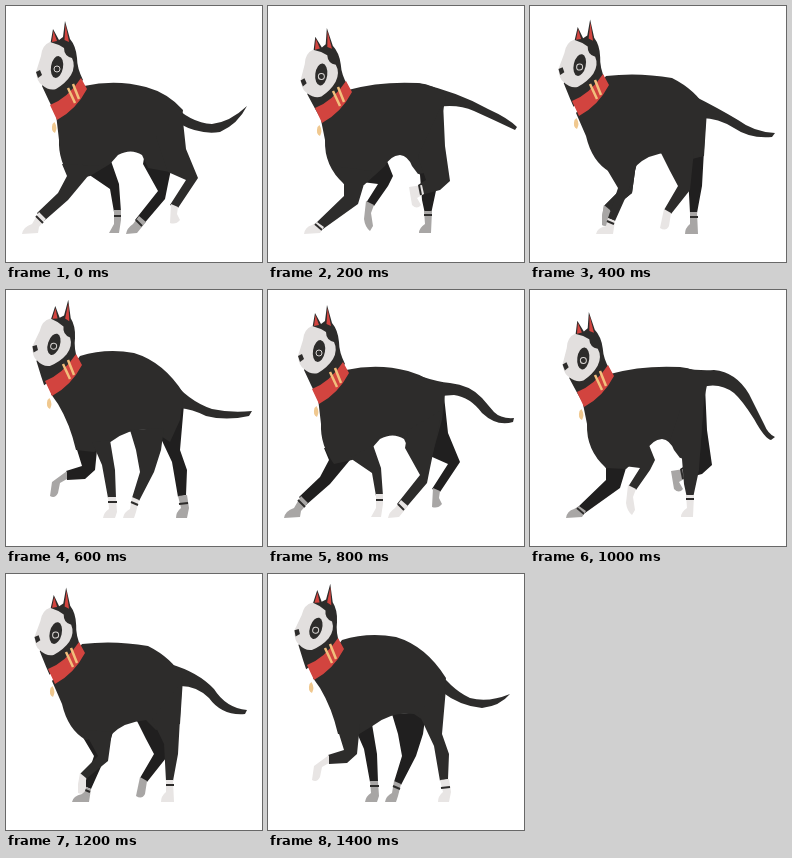
An HTML page without scripts that plays this animation: 256 by 256 pixels, repeating every 1.6 s.

```html
<!DOCTYPE html>
<html lang="en">
<head>
<meta charset="utf-8">
<title>Walking dog</title>
<style>
html, body { margin: 0; width: 100%; height: 100%; overflow: hidden; background: #fff; }
svg { display: block; width: 100vw; height: 100vh; }
.near { --coat: #2d2c2b; --paw: #e8e5e4; }
.far { --coat: #201f1f; --paw: #a8a6a5; }
.coat, .tail { fill: #2d2c2b; }
.leg { fill: var(--coat); }
.paw { fill: var(--paw); }
.band { fill: none; stroke: #2d2c2b; stroke-width: 2; }
.red { fill: #d2443f; }
.gold { fill: none; stroke: #f2bf7c; stroke-width: 2.5; }
.pose { visibility: hidden; animation: show 1.6s step-end calc((var(--i) - 8) * .2s) infinite; }
@keyframes show {
  0% { visibility: visible; }
  12.5%, 100% { visibility: hidden; }
}
</style>
</head>
<body>
<svg viewBox="0 0 256 256">
<defs>
  <g id="head">
    <path class="coat" d="M44 40L47 23L53 34L57 31L59 15L64 33Q70 40 71 52Q71 62 77 74L47 103L43 95L36 80L46 56Z"/>
    <path class="red" d="M46 36L47.500 25L51 35ZM58.500 34L59.500 18L63 36Z"/>
    <path fill="#e2dfde" d="M44 36Q36 39 35 50L30 66Q31 76 36 79Q43 85 50 83Q60 77 65 69Q70 60 66 52Q58 50 58 42Q52 38 44 36Z"/>
    <ellipse class="coat" cx="51" cy="61" rx="6" ry="11" transform="rotate(10 51 61)"/>
    <circle cx="51" cy="63" r="3" fill="none" stroke="#d8d5d3"/>
    <path class="coat" d="M30 66L34 64L36 69L32 72Z"/>
  </g>
  <g id="collar">
    <path class="red" d="M44 99Q62 92 75 72L81 83Q70 104 51 114Z"/>
    <path class="gold" d="M62 82L69 97M67 78L73 93"/>
    <path fill="#f0c88f" d="M48.500 116Q52 122 49 127Q44.500 125 46.500 118Z"/>
  </g>

  <!-- torsos: reach, contact, pass, lift -->
  <g id="t0">
    <path class="coat" d="M50 108L78 80Q110 73 140 81Q162 87 177 104L174 130L164 166L142 162L136 149Q125 142 112 149L104 158L84 170L66 174Q52 155 53 134Z"/>
    <use href="#head"/><use href="#collar"/>
  </g>
  <g id="t1">
    <path class="coat" d="M53 114L80 84Q112 75 150 77Q166 78 178 90L174 110L170 165L150 168L144 160Q140 150 132 149Q122 150 117 160L96 179L76 178Q56 160 57 134Z"/>
    <use href="#head" transform="translate(3 7.500) rotate(-3 50 75)"/><use href="#collar" transform="translate(3 3)"/>
  </g>
  <g id="t2">
    <path class="coat" d="M46 107L76 70Q108 66 142 72Q166 84 177 104L174 150L150 156L140 146Q118 148 106 160L80 166Q62 156 56 130Z"/>
    <use href="#head" transform="translate(-2 -2) rotate(3 50 75)"/><use href="#collar" transform="translate(-2 -4)"/>
  </g>
  <g id="t3">
    <path class="coat" d="M45 104L74 66Q100 58 128 63Q158 72 178 104L174 130L164 152L146 140Q124 137 106 151L88 162L70 160Q64 134 52 114Z"/>
    <use href="#head" transform="translate(-5 -7) rotate(8 50 75)"/><use href="#collar" transform="translate(-5 -8)"/>
  </g>

  <!-- front legs: s = on the ground, w = swinging -->
  <g id="fs0"><path class="leg" d="M56 158L61 170L52 187L31 207L38 215L62 194L82 170L98 160Z"/>
    <path class="paw" d="M33 206L40 213L33 221L32 227L16 228Q17 221 26 218Z"/><path class="band" d="M30 210L37 217"/></g>
  <g id="fw0"><path class="leg" d="M82 168L104 183L108 206H115L113 178L105 155Z"/>
    <path class="paw" d="M108 204H115L115 214L113 227L103 227L108 218Z"/><path class="band" d="M108 210H115"/></g>
  <g id="fs1"><path class="leg" d="M66 160L76 178L76 190L48 217L55 223L90 198L96 178L104 165Z"/>
    <path class="paw" d="M49 216L56 221L52 227L36 228Q37 221 44 219Z"/><path class="band" d="M47 218L54 224"/></g>
  <g id="fw1"><path class="leg" d="M94 176L110 178L98 197L106 200L120 180L125 170L119 155Z"/>
    <path class="paw" d="M98 195L106 199L103 207L105 220L102 225Q97 221 96 213Z"/></g>
  <g id="fs2"><path class="leg" d="M72 155L88 182L78 212L85 215L98 186L108 155Z"/>
    <path class="paw" d="M78 212L85 215L83 228H66Q67 222 76 220Z"/><path class="band" d="M77 215L84 218"/></g>
  <g id="fw2"><path class="leg" d="M78 156L92 182L74 200L80 205L102 187L106 158Z"/>
    <path class="paw" d="M74 199L80 204L80 214Q78 222 72 219L72 210Z"/></g>
  <g id="fs3"><path class="leg" d="M86 152L96 175L102 208H110L109 180L104 150Z"/>
    <path class="paw" d="M102 207H110L111 222L109 228H97Q98 222 103 219Z"/><path class="band" d="M102 212H111"/></g>
  <g id="fw3"><path class="leg" d="M68 150L76 176L60 181L61 190L79 189L89 180L92 150Z"/>
    <path class="paw" d="M61 181V189L54 193L52 203Q49 209 44 206L46 192Z"/></g>

  <!-- hind legs -->
  <g id="hs0"><path class="leg" d="M137 158L152 185L129 214L136 220L159 193L162 178L174 120L140 140Z"/>
    <path class="paw" d="M133 210L140 216L131 227L120 228Q121 222 127 218Z"/><path class="band" d="M130 214L136 220"/></g>
  <g id="hw0"><path class="leg" d="M150 130L162 166L180 174L164 199L172 202L192 172L180 143L176 106Z"/>
    <path class="paw" d="M165 198L172 201L171 208L174 214Q170 219 164 217Z"/></g>
  <g id="hs1"><path class="leg" d="M140 151L152 169L154 194L157 208H163L169 180L174 104L150 120Z"/>
    <path class="paw" d="M156 205H164L163 227H151Q151 222 157 218Z"/><path class="band" d="M156 209H164"/></g>
  <g id="hw1"><path class="leg" d="M150 150L158 174L150 179L153 189L172 184L182 175L177 140L175 96Z"/>
    <path class="paw" d="M154 179L156 188L149 192L153 199Q149 204 144 199L141 181Z"/><path class="band" d="M151 179L153 189"/></g>
  <g id="hs2"><path class="leg" d="M146 145L158 170L160 207H167L172 180L176 108Z"/>
    <path class="paw" d="M160 206H167L168 228H155Q155 222 160 218Z"/><path class="band" d="M160 211H168"/></g>
  <g id="hw2"><path class="leg" d="M130 145L140 165L148 180L134 204L141 208L160 184L164 145Z"/>
    <path class="paw" d="M134 203L141 207L139 220Q136 226 130 222Z"/></g>
  <g id="hs3"><path class="leg" d="M150 138L166 172L172 207L180 205L181 180L174 160L178 114Z"/>
    <path class="paw" d="M172 206L181 205L183 218L181 228H170Q170 222 175 218Z"/><path class="band" d="M173 214L182 213"/></g>
  <g id="hw3"><path class="leg" d="M124 140L130 160L134 182L126 208L133 211L148 182L155 160L158 138Z"/>
    <path class="paw" d="M126 207L133 210L130 222L128 228H117Q118 222 124 219Z"/><path class="band" d="M125 212L132 215"/></g>
</defs>

<g class="pose" style="--i:0">
  <g class="far"><use href="#fw0"/><use href="#hs0"/></g>
  <path class="tail" d="M164 96Q184 117 206 118Q224 116 241 100Q232 118 214 126Q194 129 174 118Z"/>
  <use href="#t0"/>
  <g class="near"><use href="#fs0"/><use href="#hw0"/></g>
</g>
<g class="pose" style="--i:1">
  <g class="far"><use href="#fw1"/><use href="#hs1"/></g>
  <path class="tail" d="M150 77Q190 86 220 103Q240 112 249 121L247 124Q226 114 206 105Q190 98 170 101Z"/>
  <use href="#t1"/>
  <g class="near"><use href="#fs1"/><use href="#hw1"/></g>
</g>
<g class="pose" style="--i:2">
  <g class="far"><use href="#fw2"/><use href="#hs2"/></g>
  <path class="tail" d="M164 90Q188 102 208 114Q224 126 245 127L242 131Q220 133 204 122Q188 112 172 112Z"/>
  <use href="#t2"/>
  <g class="near"><use href="#fw2" style="--paw:#a8a6a5"/><use href="#fs2"/><use href="#hw2"/></g>
</g>
<g class="pose" style="--i:3">
  <g class="far"><use href="#fw3"/><use href="#hs3"/></g>
  <path class="tail" d="M164 88Q182 111 206 119Q224 123 246 121L243 126Q220 131 200 126Q186 119 174 118Z"/>
  <use href="#t3"/>
  <g class="near"><use href="#fs3"/><use href="#hw3"/></g>
</g>
<g class="pose" style="--i:4">
  <g class="far"><use href="#fs0"/><use href="#hw0"/></g>
  <path class="tail" d="M152 86Q170 92 182 93Q202 95 214 108L226 122Q233 129 246 128L245 132Q229 137 214 123Q202 107 186 105L172 106Z"/>
  <use href="#t0"/>
  <g class="near"><use href="#fw0"/><use href="#hs0"/></g>
</g>
<g class="pose" style="--i:5">
  <g class="far"><use href="#fs1"/><use href="#hw1"/></g>
  <path class="tail" d="M152 78Q170 81 184 80Q206 82 219 104L234 134Q238 144 245 147L241 150Q235 149 224 129Q212 110 204 103Q190 92 172 97Z"/>
  <use href="#t1"/>
  <g class="near"><use href="#fw1"/><use href="#hs1"/></g>
</g>
<g class="pose" style="--i:6">
  <g class="far"><use href="#fs2"/><use href="#hw2"/></g>
  <path class="tail" d="M164 90Q192 98 208 115Q220 134 241 136L239 140Q216 142 203 124Q190 111 172 112Z"/>
  <use href="#t2"/>
  <g class="near"><use href="#fw2"/><use href="#hs2"/></g>
</g>
<g class="pose" style="--i:7">
  <g class="far"><use href="#fs3"/><use href="#hw3"/></g>
  <path class="tail" d="M164 88Q182 115 202 124Q220 129 242 120Q232 132 214 134Q192 132 174 118Z"/>
  <use href="#t3"/>
  <g class="near"><use href="#fw3"/><use href="#hs3"/></g>
</g>
</svg>
</body>
</html>
```
